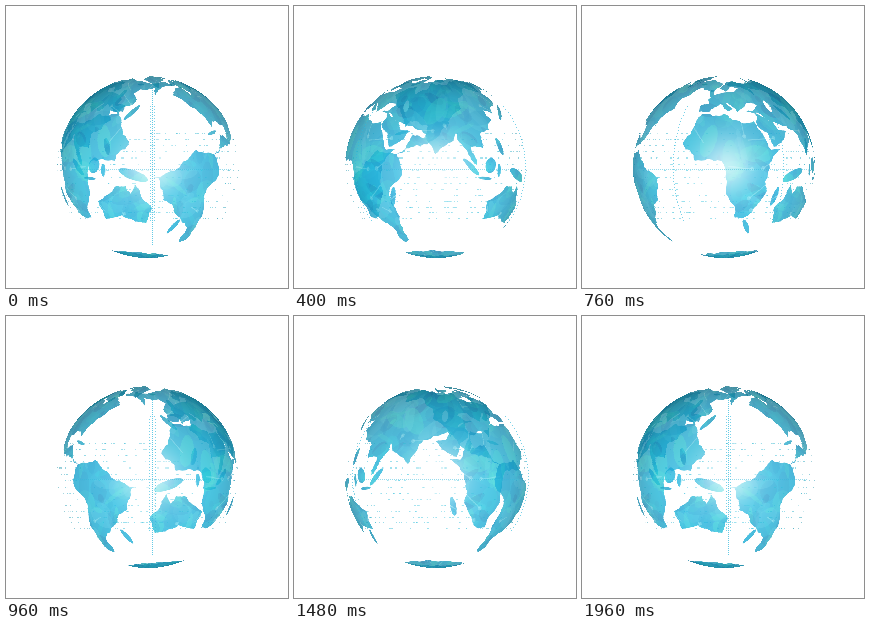
These frames come from a looping animation (282 by 282 pixels, 2 s). An HTML page with a canvas:

```html
<!DOCTYPE html>
<html>
<head>
<meta charset="utf-8">
<style>
html, body { margin: 0; width: 100%; height: 100%; overflow: hidden; background: #fff; }
canvas { display: block; }
</style>
</head>
<body>
<canvas id="stage" width="282" height="282"></canvas>
<script>
const SIZE = 282, CX = 142, CY = 161, R = 91;
const START_LON = 150.5, FRAME_MS = 40, FRAMES = 50;
const SCALE = 3, MAP_W = 360 * SCALE, MAP_H = 180 * SCALE;
const RAD = Math.PI / 180;

let seed = 7;
const rnd = () => (seed = seed * 16807 % 2147483647) / 2147483647;
const pick = list => list[Math.floor(rnd() * list.length)];

// Coarse coastlines as lon, lat pairs; roughen() adds the detail
const northAmerica = [-168,66,-128,70,-95,68,-94,60,-80,52,-77,62,-65,59,-56,52,-66,44,-76,35,-81,26,-84,30,-97,27,-95,18,-87,21,-83,10,-77,8,-88,13,-105,20,-113,31,-110,24,-124,40,-124,48,-137,59,-158,56,-165,62];
const southAmerica = [-77,8,-62,11,-50,0,-35,-6,-40,-21,-48,-27,-57,-37,-65,-43,-66,-55,-73,-53,-73,-38,-70,-18,-81,-5];
const africa = [-6,36,11,36,20,31,33,30,43,11,51,12,40,-3,40,-15,32,-28,26,-34,19,-34,12,-17,9,4,-8,4,-17,14,-10,29];
const europe = [-9,37,-9,43,-2,44,-4,48,8,54,20,55,30,60,22,62,24,66,17,60,12,56,6,59,14,68,25,71,40,66,68,69,60,45,36,36,27,38,41,42,33,45,28,41,22,37,13,45,18,40,15,38,8,44,-1,37];
const asia = [67,69,80,73,104,77,130,71,180,69,190,66,163,58,157,51,160,61,142,59,135,54,140,48,128,40,127,35,118,39,122,31,108,21,109,12,100,13,104,1,98,8,91,22,80,12,77,8,70,21,57,27,48,30,36,37,60,56];
const arabia = [48,30,51,25,59,23,45,13,35,28,36,37];
const australia = [114,-22,130,-12,136,-12,139,-17,142,-11,146,-19,153,-27,149,-38,138,-35,131,-32,116,-35];
const greenland = [-72,78,-35,83,-20,74,-43,60,-54,70];
const lands = [northAmerica, southAmerica, africa, europe, asia, arabia, australia, greenland];

// Islands: lon, lat, half width, half height, tilt
const islands = [
  [-73,68,10,3,30], [-110,71,9,3,0], [-78,79,12,3,0], [-2,54,2.5,4.5,-15],
  [-19,65,4.5,1.5,0], [47,-19,2,6.5,15], [138,37,8,1.8,-45], [100,0,7.5,1.8,45],
  [110,-7,5,1,5], [114,1,4,5,20], [121,-2,1.5,4,0], [141,-5,10,3,20],
  [123,13,2,6,-20], [172,-41,2,7,35], [-79,22,5,1,15], [58,73,7,1.8,-50]
];
const caspian = [51, 42, 2.5, 5, -15];

function roughen(points, levels) {
  if (!levels) return points;
  const out = [];
  points.forEach(([x, y], i) => {
    const [x2, y2] = points[(i + 1) % points.length];
    const bend = (rnd() - 0.5) * 0.3;
    out.push([x, y], [(x + x2) / 2 + (y2 - y) * bend, (y + y2) / 2 - (x2 - x) * bend]);
  });
  return roughen(out, levels - 1);
}

function makeMap() {
  const g = Object.assign(document.createElement('canvas'),
    { width: MAP_W, height: MAP_H }).getContext('2d');
  const mapX = lon => (lon + 180) * SCALE, mapY = lat => (90 - lat) * SCALE;
  const ellipse = ([lon, lat, rx, ry, tilt]) => {
    g.beginPath();
    g.ellipse(mapX(lon), mapY(lat), rx * SCALE, ry * SCALE, tilt * RAD, 0, 7);
    g.fill();
  };
  g.fillStyle = 'rgb(30,180,222)';
  for (const land of lands) {
    const corners = [];
    for (let i = 0; i < land.length; i += 2) corners.push([land[i], land[i + 1]]);
    const coast = roughen(corners, 3);
    for (const wrap of [-360, 0, 360]) {
      g.beginPath();
      for (const [lon, lat] of coast) g.lineTo(mapX(lon + wrap), mapY(lat));
      g.fill();
    }
  }
  islands.forEach(ellipse);
  // Southern ice sheet
  for (let lon = -180; lon < 180; lon++) {
    const edge = -72 + 5 * Math.cos((lon - 70) * RAD) + Math.sin(lon * 0.2);
    g.fillRect(mapX(lon), mapY(edge), SCALE, MAP_H);
  }
  g.globalCompositeOperation = 'destination-out';
  ellipse(caspian);

  // Mottled surface
  g.globalCompositeOperation = 'source-atop';
  const tints = ['20,130,190', '25,205,228', '50,228,215', '15,155,212', '70,205,235'];
  for (let i = 0; i < 900; i++) {
    g.fillStyle = `rgba(${pick(tints)},${0.12 + rnd() * 0.3})`;
    g.beginPath();
    g.ellipse(rnd() * MAP_W, rnd() * MAP_H, 6 + rnd() * 36, 4 + rnd() * 18, rnd() * 3, 0, 7);
    g.fill();
  }
  // Light network
  g.strokeStyle = g.fillStyle = 'rgba(150,240,250,.4)';
  g.lineWidth = 2;
  for (let i = 0; i < 90; i++) {
    const x = rnd() * MAP_W, y = rnd() * MAP_H;
    g.beginPath();
    g.moveTo(x, y);
    g.lineTo(x + rnd() * 120 - 60, y + rnd() * 120 - 60);
    g.stroke();
    g.beginPath();
    g.arc(x, y, 4, 0, 7);
    g.fill();
  }
  // Sparse dotted rows on the sea
  g.globalCompositeOperation = 'destination-over';
  g.fillStyle = 'rgba(40,190,220,.6)';
  for (let lat = -34; lat < 24; lat += 4)
    for (let lon = -180; lon < 180; lon += 2)
      if (rnd() < 0.15) g.fillRect(mapX(lon), mapY(lat), 2 + rnd() * 3, 2);
  return g.getImageData(0, 0, MAP_W, MAP_H).data;
}

const map = makeMap();
const ctx = document.getElementById('stage').getContext('2d');
const image = ctx.createImageData(SIZE, SIZE);
const pixels = [];
for (let y = CY - R; y < CY + R; y++)
  for (let x = CX - R; x < CX + R; x++) {
    const u = (x + 0.5 - CX) / R, v = (y + 0.5 - CY) / R, d = u * u + v * v;
    if (d >= 1) continue;
    pixels.push({
      at: (y * SIZE + x) * 4,
      row: Math.floor((90 + Math.asin(v) / RAD) * SCALE) * MAP_W,
      lon: Math.asin(u / Math.sqrt(1 - v * v)) / RAD,
      shade: 1 - 0.25 * d ** 3 - 0.13 * Math.max(0, -v),
      glow: 0.65 * Math.exp(-((x - 144) ** 2 + (y - 160) ** 2) / 900)
    });
  }

function layer(p, lon, alpha) {
  const col = Math.floor((((lon + 180) % 360 + 360) % 360) * SCALE);
  const m = (p.row + col) * 4, a = map[m + 3] / 255 * alpha, out = image.data;
  for (let k = 0; k < 3; k++)
    out[p.at + k] += (map[m + k] * p.shade - out[p.at + k]) * a;
}

function dot(x, y, alpha) {
  ctx.fillStyle = `rgba(50,185,220,${alpha})`;
  ctx.fillRect(Math.round(x), Math.round(y), 1, 1);
}

function draw() {
  const frame = Math.floor(performance.now() / FRAME_MS) % FRAMES;
  const center = START_LON - 360 * frame / (FRAMES - 1);
  const out = image.data.fill(255);
  for (const p of pixels) {
    layer(p, center + 180 - p.lon, 0.78);
    layer(p, center + p.lon, 0.8);
    for (let k = 0; k < 3; k++) out[p.at + k] += (255 - out[p.at + k]) * p.glow;
  }
  ctx.putImageData(image, 0, 0);

  for (let x = 66; x < 226; x += 2) dot(x, 163, 0.5);
  for (const lon of [152, -28]) {
    const side = Math.sin((lon - center) * RAD);
    for (let y = 100; y < 215; y += 3)
      dot(146 + 88 * side * Math.sqrt(1 - ((y - CY) / R) ** 2), y, 0.65);
  }
  // The meridians merge into a stronger axis when they face the viewer
  if (Math.abs(Math.sin((152 - center) * RAD)) < 0.06)
    for (let y = 84; y < 240; y += 2) dot(146, y, 0.75);
  requestAnimationFrame(draw);
}
draw();
</script>
</body>
</html>
```
